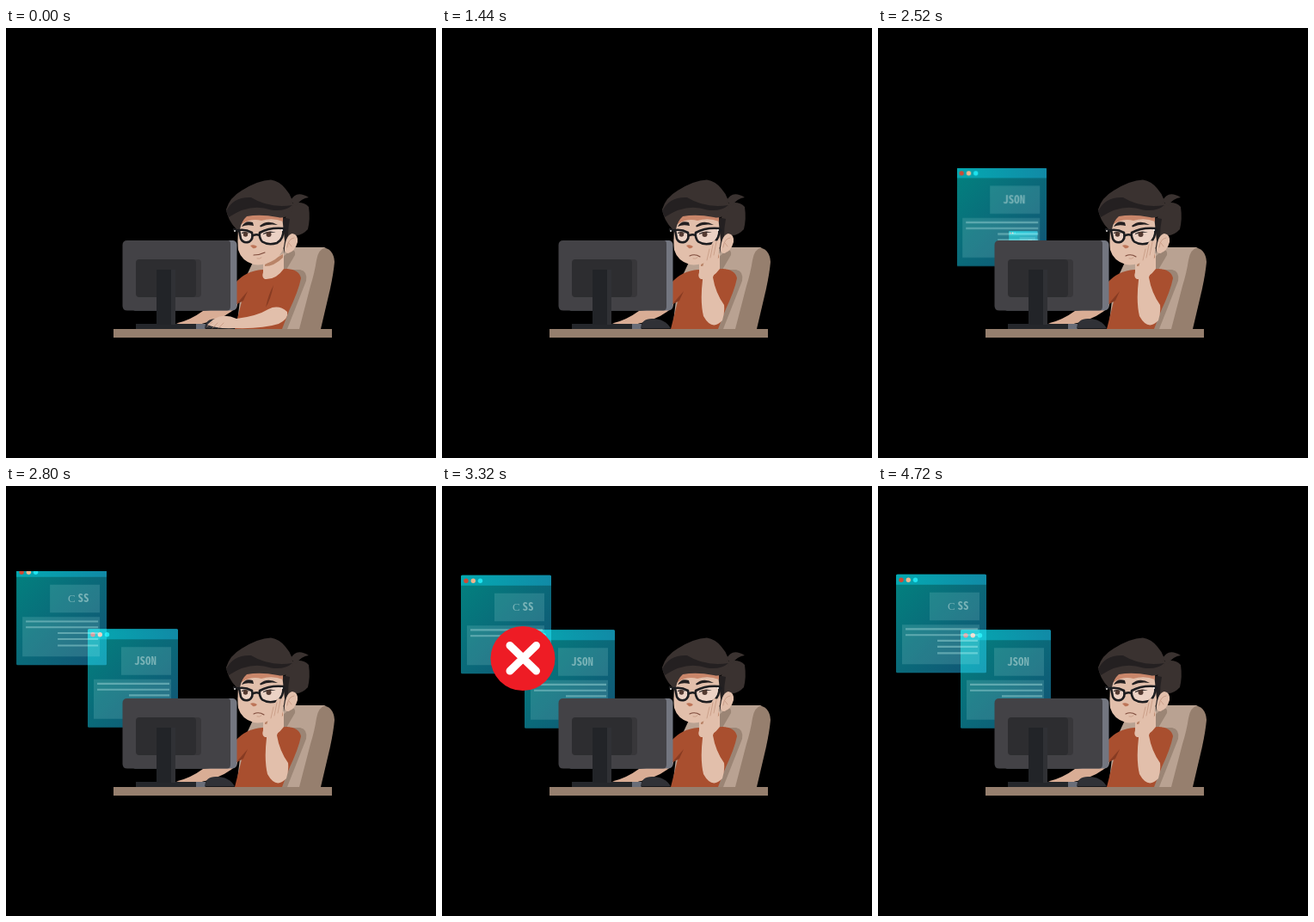
An HTML page that plays this animation: 500x500 px, repeating every 4760 ms.

```html
<!DOCTYPE html>
<html lang="en">
<head>
<meta charset="utf-8">
<title>Coder at a desk</title>
<style>
html, body { margin: 0; width: 100%; height: 100%; overflow: hidden; background: #000; }
svg { display: block; width: 100%; height: 100%; }

.skin { fill: #e2bfab; }
.tan { fill: #d9ad95; }
.hair { fill: #3a3230; }
.dark { fill: #242021; }
.shirt { fill: #a94f2f; }
.fold { fill: #873b22; }
.wood { fill: #967f6e; }
.line { fill: none; stroke: #c2937c; stroke-width: .7; stroke-linecap: round; }
.frame { fill: #ecd2c5; stroke: #1d1d20; stroke-width: 2.6; stroke-linejoin: round; }
.panel { fill: #8fd0d2; opacity: .2; }
.rows { stroke: #7fc0c4; stroke-width: 2.1; opacity: .65; }
.label { fill: #79b3b7; font: bold 13px "Noto Sans Mono CJK JP", "Noto Sans Mono CJK SC", "Noto Sans Mono", monospace; }
.serif { font: 13px "Liberation Serif", serif; }

.anim { animation: 4760ms linear infinite both; }
.pop { transform-box: fill-box; transform-origin: center; }
.arm { animation-name: arm; }
.fingers { animation-name: fingers; }
.mouth { animation-name: mouth; fill: none; stroke: #7d4a3b; stroke-width: 1.1; stroke-linecap: round; }
.css { animation-name: css; }
.json { animation-name: json; mix-blend-mode: screen; }
.error { animation-name: error; }

@keyframes arm {
  0%, 8.4% {
    d: path("M305 327 Q292 335 268 338 Q253 331 241 339 L234 345 Q245 350 266 349 Q298 350 317 344 Q329 338 327 330 Q317 321 305 327 Z");
    animation-timing-function: ease-in;
  }
  19.33% {
    d: path("M315 321 Q296 309 284 293 Q284 278 273 263 L266 264 Q266 288 276 298 Q287 321 305 338 Q321 352 326 341 Q330 324 315 321 Z");
    animation-timing-function: ease-out;
  }
  27.8%, 100% {
    d: path("M328 322 Q318 308 315 290 Q323 270 322 248 L316 247 Q300 272 303 293 Q300 318 304 335 Q314 353 326 340 Q329 331 328 322 Z");
  }
}
@keyframes fingers {
  0%, 8.4% { d: path("M240 342 L234 347 M246 343 L240 349 M253 343 L247 349"); animation-timing-function: ease-in; }
  19.33% { d: path("M276 276 L270 266 M279 282 L271 275 M280 288 L271 283"); animation-timing-function: ease-out; }
  27.8%, 100% { d: path("M316 264 L319 249 M312 267 L315 252 M308 270 L311 257"); }
}
@keyframes mouth {
  0%, 25.2% { d: path("M288 264 Q295 264 301 261"); }
  29.4%, 100% { d: path("M288 265 Q294 262 300 266"); }
}
@keyframes json {
  0%, 44.1% { transform: translate(54px, 64px) scale(0); animation-timing-function: ease-in; }
  50.4% { transform: translate(10px, 12px); }
  52.5% { transform: translate(-5px, -5px); }
  54.6% { transform: translate(-4px, -4px); }
  58.8% { transform: translate(-1px, -1px); }
  63% { transform: translate(.5px, .5px); }
  70%, 100% { transform: none; }
}
@keyframes css {
  0%, 50.4% { transform: translate(129px, 128px) scale(0); animation-timing-function: ease-in; }
  55.5% { transform: translate(23px, 23px); }
  57.6% { transform: translate(-11px, -11px); }
  58.8% { transform: translate(-9px, -9px); }
  62.2% { transform: translate(-3px, -3px); }
  67.2%, 70% { transform: translate(1px, 1px); }
  75%, 100% { transform: none; }
}
@keyframes error {
  0%, 63.5% { transform: scale(0); animation-timing-function: ease-out; }
  66% { transform: scale(1.1); }
  68%, 75% { transform: none; animation-timing-function: ease-in; }
  78.2%, 100% { transform: scale(0); }
}
</style>
</head>
<body>
<svg viewBox="0 0 500 500">
  <defs>
    <linearGradient id="pane" x2="1" y2="1">
      <stop stop-color="#02827f"/><stop offset="1" stop-color="#125274"/>
    </linearGradient>
    <linearGradient id="bar">
      <stop stop-color="#04a9b1"/><stop offset="1" stop-color="#118aa6"/>
    </linearGradient>
    <clipPath id="stage"><path d="M0 99H500V500H0Z"/></clipPath>
    <g id="window">
      <rect width="105" height="114.5" rx="1.5" fill="url(#pane)"/>
      <path d="M0 12V1.5Q0 0 1.5 0H103.5Q105 0 105 1.5V12Z" fill="url(#bar)"/>
      <circle cx="6" cy="6.5" r="2.7" fill="#cf4a35"/>
      <circle cx="14.3" cy="6.5" r="2.7" fill="#efb58c"/>
      <circle cx="22.5" cy="6.5" r="2.7" fill="#1fe3ee"/>
      <path class="panel" d="M39 21H97V53.5H39ZM7 58.5H97V104.5H7Z"/>
      <path class="rows" d="M11 63.7H95M11 70.5H95M48 77.2H95M48 84.2H95M48 91.7H95"/>
    </g>
  </defs>

  <!-- Browser windows -->
  <g clip-path="url(#stage)">
    <g class="anim pop css">
      <g transform="translate(21 102.7)">
        <use href="#window"/>
        <text class="label serif" x="60" y="41.5">C</text>
        <text class="label" x="71.5" y="41.5">SS</text>
      </g>
    </g>
    <g class="anim pop json">
      <g transform="translate(96 167.2)">
        <use href="#window"/>
        <text class="label" x="67" y="41.5" text-anchor="middle">JSON</text>
      </g>
    </g>
  </g>
  <g class="anim pop error">
    <circle cx="94" cy="200.5" r="37.5" fill="#ee1c25"/>
    <path d="M79 185.5L109.5 215M109.5 185.5L79 215" stroke="#fff" stroke-width="9" stroke-linecap="round"/>
  </g>

  <!-- Chair -->
  <path class="wood" d="M329 255H367Q381 256 382 272Q381 284 377 303L366 350H330Z"/>
  <path d="M292 262L329 255H372Q363 257 361 270Q359 284 354 300L341 350H268L274 300Z" fill="#b9a292"/>
  <path d="M318 270L331 258Q337 257 336 264L326 281H342Q351 283 349 294L327 350H315Z" fill="#9b8575"/>

  <!-- Body -->
  <path class="tan" d="M198 343.5Q214 340 229 329L256 326L270 318L268 325Q254 337 240 340Q226 346 210 345.5Z"/>
  <path class="shirt" d="M266 297Q279 282 298 281L327 280Q341 281 343 291Q340 306 329 329L321 350H266L274 318L266 322Z"/>
  <path class="fold" d="M267 322L281 306L276 317ZM302 325Q305 310 311 299Q308 315 302 325Z"/>
  <path class="skin" d="M299 274L323 262V280Q314 293 301 292Q297 290 299 284Z"/>
  <path d="M301 275L322 263V267Q312 277 301 277Z" fill="#b98468"/>

  <!-- Head -->
  <path class="hair" d="M329 205Q345 200 352 208Q354 222 351 234Q344 242 335 241Q328 242 327 262Q320 250 323 228Z"/>
  <path class="hair" d="M331 201Q337 188 352 197Q343 198 337 207Z"/>
  <path class="dark" d="M321 220L330 222Q328 232 328 242Q325 250 324 262Q321 251 322 240Z"/>
  <path class="skin" d="M324 255Q326 240 333 239Q340 240 339 249Q336 260 328 262Q323 262 324 255Z"/>
  <path class="line" d="M327 255Q328 245 335 244M329 250L332 254"/>
  <path class="skin" d="M273 218H321L324 248Q323 262 313 269Q300 277 288 275Q274 271 270 258Q268 238 273 218Z"/>
  <path d="M274 216H322V225Q310 220 297 224Q285 221 274 228Z" fill="#c9866a"/>
  <path class="hair" d="M256 211Q260 197 274 189Q293 177 308 176.5Q318 178 325 187Q335 198 333 211Q327 223 316 220Q296 216 280 219Q274 224 272 234H268Q258 224 256 211Z"/>
  <path class="dark" d="M256 213Q264 196 285 197Q306 210 333 206Q324 214 308 211.5Q284 203 259 220Z"/>

  <!-- Face -->
  <path class="dark" d="M274 231Q278 223 287 226L288 230Q280 228 274 231ZM295 230Q304 222 316 229Q305 227 296 231.500Z"/>
  <path class="frame" d="M271 235Q279 234 286 238Q288 245 283 248.500Q276 251 273 245ZM295 238Q307 231.500 322.500 233Q323 246 315 250Q305 253 298 248.500Q294 244 295 238Z"/>
  <path d="M264 234L271 236M286 242Q290 239 295 241M322 233L325 236" fill="none" stroke="#1d1d20" stroke-width="2.600"/>
  <path class="dark" d="M274 238Q279 235.500 283 239Q279 237.500 274 239ZM299 239Q306 234.500 314 238Q306 237 299 240Z"/>
  <g fill="#533a32"><circle cx="278.5" cy="240" r="2.700"/><circle cx="305.5" cy="240" r="3"/></g>
  <g fill="#f4efec"><circle cx="266" cy="236" r=".9"/><circle cx="321" cy="235" r="1"/></g>
  <path d="M284 253Q288 251 292 254Q290 257 287 256Z" fill="#bd7558"/>
  <path class="anim mouth" d="M288 264Q295 264 301 261"/>
  <path class="line" d="M292 268Q295 269 297 267"/>

  <!-- Desk -->
  <path d="M151 344H221V350H151Z" fill="#25272b"/>
  <path d="M221 344H232V350H221Z" fill="#696d78"/>
  <path d="M231 349Q232 338 244 338Q260 338 266 349.5H231Z" fill="#303136"/>
  <path class="anim arm skin" d="M305 327Q292 335 268 338Q253 331 241 339L234 345Q245 350 266 349Q298 350 317 344Q329 338 327 330Q317 321 305 327Z"/>
  <path class="anim fingers line" d="M240 342L234 347M246 343L240 349M253 343L247 349"/>
  <path class="wood" d="M125 350H379V360H125Z"/>

  <!-- Monitor -->
  <rect x="145" y="247" width="123.5" height="81.5" rx="5" fill="#737680"/>
  <path d="M141 247H258Q261 247 261 251V324Q261 328.5 257 328.5H141Q135.5 328.5 135.5 323V252.5Q135.5 247 141 247Z" fill="#434246"/>
  <rect x="155" y="269" width="72" height="44" rx="4" fill="#38373a"/>
  <rect x="151" y="269" width="70" height="44" rx="4" fill="#2d2d30"/>
  <path d="M175 281H197V345H175Z" fill="#303135"/>
  <path d="M175 281H192V345H175Z" fill="#222428"/>
</svg>
</body>
</html>
```
